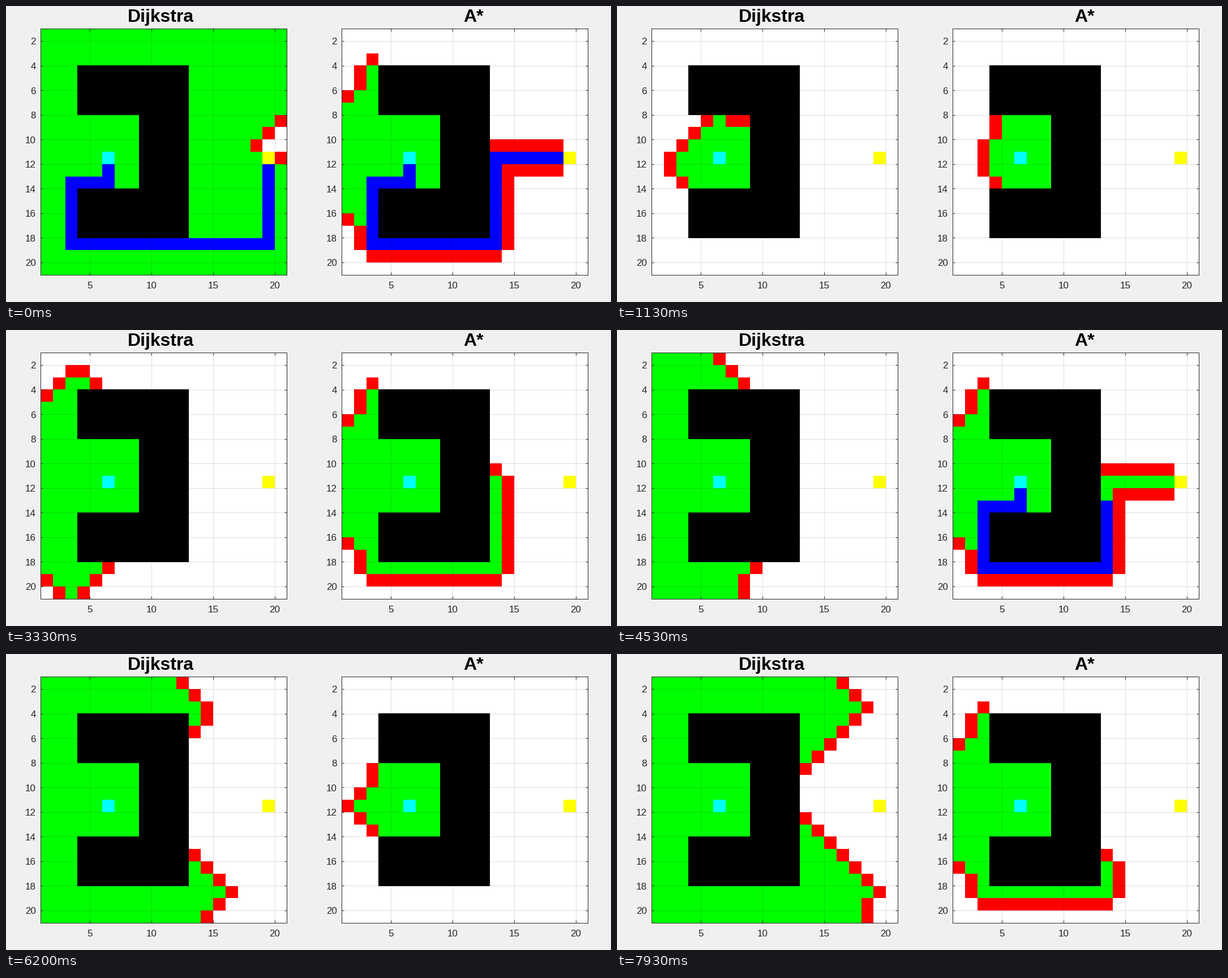
Animation of 1069 by 524 pixels, one loop 8 s. Source, as a matplotlib script:

```python
import math

import matplotlib.pyplot as plt
import numpy as np
from matplotlib.animation import FuncAnimation

W, H, DPI = 1069, 524, 64
PT = 72 / DPI               # points per pixel
FRAMES, TICK_MS = 320, 25
PICTURES_PER_S = 15
N = 20                      # cells per side
SIZE, TOP = 435.4, 40.2     # board size and top edge in pixels
CELL = SIZE / N
START, GOAL = (6, 11), (19, 11)
STEPS = ((0, 1), (1, 0), (0, -1), (-1, 0))
INK = "#262626"
FREE, WALL, OPEN, CLOSED, PATH, HOME, TARGET = range(7)
PALETTE = np.array([
    (255, 255, 255), (0, 0, 0), (255, 0, 0), (0, 255, 0),
    (0, 0, 255), (0, 255, 255), (255, 255, 0)], dtype=np.uint8)


def is_wall(x, y):
    return 4 <= x <= 12 and 4 <= y <= 17 and (x >= 9 or not 8 <= y <= 13)


def by_steps(cell, steps):
    return steps


def by_estimate(cell, steps):
    x, y = cell
    walked = abs(x - START[0]) + abs(y - START[1])
    return walked + math.hypot(GOAL[0] - x, GOAL[1] - y), y


class Search:
    """Runs a search once and remembers when each cell was found and closed."""

    def __init__(self, key):
        self.found, self.closed = {START: 0}, {}
        parent, steps = {}, {START: 0}
        queue = {START: key(START, 0)}
        while True:
            cell = min(queue, key=queue.get)
            if cell == GOAL:
                break
            del queue[cell]
            turn = len(self.closed) + 1
            self.closed[cell] = turn
            for dx, dy in STEPS:
                near = cell[0] + dx, cell[1] + dy
                inside = 1 <= near[0] <= N and 1 <= near[1] <= N
                if not inside or is_wall(*near) or near in steps:
                    continue
                steps[near] = steps[cell] + 1
                parent[near] = cell
                self.found[near] = turn
                queue[near] = key(near, steps[near])
        self.path = []
        cell = parent[GOAL]
        while cell != START:
            self.path.insert(0, cell)
            cell = parent[cell]
        self.length = len(self.closed) + len(self.path)

    def image(self, turn):
        grid = np.full((N, N), FREE)

        def put(cell, kind):
            grid[cell[1] - 1, cell[0] - 1] = kind

        for y in range(1, N + 1):
            for x in range(1, N + 1):
                if is_wall(x, y):
                    put((x, y), WALL)
        for cells, kind in ((self.found, OPEN), (self.closed, CLOSED)):
            for cell, when in cells.items():
                if when <= turn:
                    put(cell, kind)
        for cell in self.path[:max(0, turn - len(self.closed))]:
            put(cell, PATH)
        put(START, HOME)
        put(GOAL, TARGET)
        return PALETTE[grid]


fig = plt.figure(figsize=(W / DPI, H / DPI), dpi=DPI, facecolor="#f0f0f0")
ax = fig.add_axes((0, 0, 1, 1))
ax.axis("off")


def lines(pieces, **style):
    """Draws separate straight pieces as one artist."""
    xs, ys = [], []
    for x0, y0, x1, y1 in pieces:
        xs += [x0, x1, math.nan]
        ys += [y0, y1, math.nan]
    ax.plot(xs, ys, color=INK, lw=PT, solid_capstyle="butt", **style)


def label(x, y, text, size, **style):
    ax.text(x, y, text, family="Liberation Sans", fontsize=size * PT,
            va="baseline", **style)


def board(left, title, title_x):
    right, bottom = left + SIZE, TOP + SIZE
    picture = ax.imshow(np.full((N, N, 3), 255, dtype=np.uint8),
                        extent=(left, right, bottom, TOP),
                        interpolation="nearest", aspect="auto", zorder=1)
    tick = 4.4
    columns, rows, ticks = [], [], []
    for value in range(5, 21, 5):
        x = left + (value - 1) * CELL
        columns.append((x, TOP, x, bottom))
        ticks += [(x, TOP, x, TOP + tick), (x, bottom - tick, x, bottom)]
        label(x, 500, str(value), 17, color=INK, ha="center")
    for value in range(2, 21, 2):
        y = TOP + (value - 1) * CELL
        rows.append((left, y, right, y))
        ticks += [(left, y, left + tick, y), (right - tick, y, right, y)]
        label(left - 8, y + 6.5, str(value), 17, color=INK, ha="right")
    lines(columns, alpha=0.15, zorder=2)
    lines(rows, alpha=0.15, zorder=2)
    lines(ticks, zorder=3)
    ax.plot((left, right, right, left, left),
            (TOP, TOP, bottom, bottom, TOP), color=INK, lw=PT, zorder=4)
    label(title_x, 28, title, 32, color="black", weight="bold", ha="left")
    return picture


boards = [
    (Search(by_steps), board(61, "Dijkstra", 215.2)),
    (Search(by_estimate), board(593, "A*", 808.3)),
]
ax.set_xlim(0, W)
ax.set_ylim(H, 0)


def update(frame):
    # Show the picture that falls due before this tick ends.
    tick_end = (frame + 1) * TICK_MS - 1
    step = tick_end * PICTURES_PER_S // 1000
    turn = step * 5 // 3 - 1
    for search, picture in boards:
        # The loop opens on finished boards, then both searches restart.
        shown = turn % (search.length + 1) if step else search.length
        picture.set_data(search.image(shown))
    return [picture for _, picture in boards]


anim = FuncAnimation(fig, update, frames=FRAMES, interval=TICK_MS,
                     repeat=True, repeat_delay=0)
plt.show()
```
